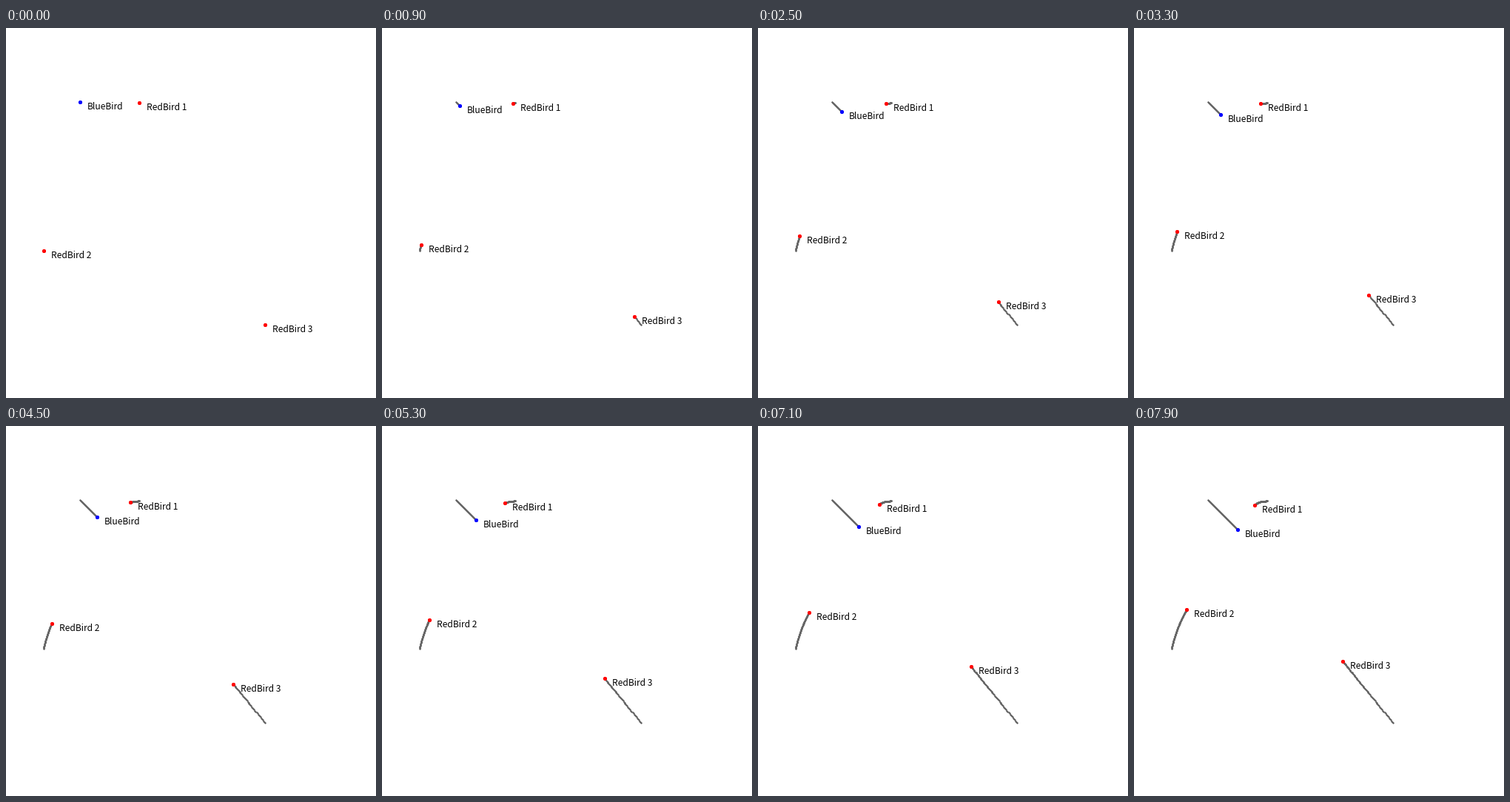
A matplotlib script for the animation above (8000 ms loop, 500x500 px).

```python
import numpy as np
import matplotlib.pyplot as plt
from matplotlib.animation import FuncAnimation
from matplotlib.collections import PolyCollection
from matplotlib.patches import Polygon

SIZE, DPI = 500, 100
FRAMES, INTERVAL = 80, 100
SPEED = 0.5       # target drift per step, along x and y
PULL = 0.00445    # share of the gap a chaser closes per step
FONT_PX = 12


def spot(size, cut):
    """Small disc as a cut-off square, centred on the middle of a pixel."""
    r = size / 2
    c = r - cut
    return 0.5 + np.array([(-c, -r), (c, -r), (r, -c), (r, c),
                           (c, r), (-c, r), (-r, c), (-r, -c)])


DISC = spot(5, 1.3)
MARK = spot(3, 1.4)

steps = np.arange(1, FRAMES + 1)[:, None]
prey = 100 + SPEED * steps * np.ones(2)


def chase(x, y):
    """Path of a bird that flies towards the prey, slower as it nears."""
    gap = np.array([x, y]) - 100
    lag = SPEED / PULL
    return prey - lag + (gap + lag) * np.exp(-PULL * steps)


class Bird:
    def __init__(self, ax, name, color, path):
        self.path = np.floor(path).astype(int)
        self.trail = PolyCollection([], facecolors="#666666", linewidths=0,
                                    zorder=1)
        ax.add_collection(self.trail, autolim=False)
        self.dot = ax.add_patch(Polygon(DISC, facecolor=color, linewidth=0,
                                        zorder=2))
        self.label = ax.text(0, 0, name, family="Noto Sans CJK JP",
                             size=FONT_PX * 72 / DPI, color="black",
                             va="baseline", ha="left", zorder=3)

    def show(self, n):
        pos = self.path[n]
        self.trail.set_verts(self.path[:n + 1, None] + MARK)
        self.dot.set_xy(pos + DISC)
        self.label.set_position(pos + 10)
        return self.trail, self.dot, self.label


fig = plt.figure(figsize=(SIZE / DPI, SIZE / DPI), dpi=DPI, facecolor="white")
ax = fig.add_axes([0, 0, 1, 1])
ax.set_xlim(0, SIZE)
ax.set_ylim(SIZE, 0)
ax.axis("off")

birds = [
    Bird(ax, "BlueBird", "#0000ff", prey),
    Bird(ax, "RedBird 1", "#ff0000", chase(181.3, 102)),
    Bird(ax, "RedBird 2", "#ff0000", chase(50.8, 302.5)),
    Bird(ax, "RedBird 3", "#ff0000", chase(351.95, 403.1)),
]


def update(n):
    return [part for bird in birds for part in bird.show(n)]


anim = FuncAnimation(fig, update, frames=FRAMES, interval=INTERVAL,
                     repeat=True, repeat_delay=0, blit=False)
plt.show()
```
